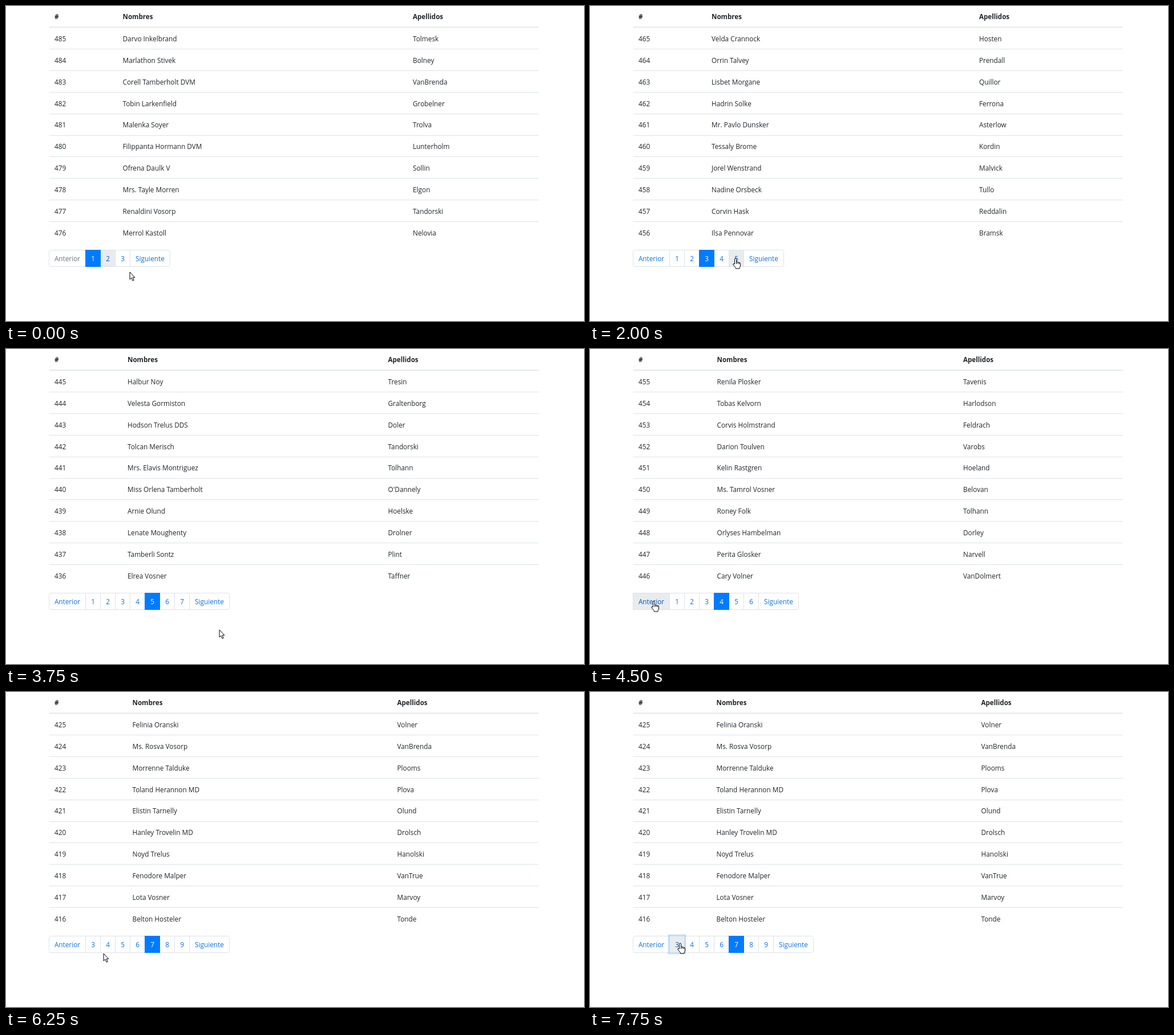
These frames come from a looping animation (1013x553 px, 8 s). An HTML page:

```html
<!DOCTYPE html>
<html lang="es">
<head>
<meta charset="utf-8">
<style>
  html, body { margin: 0; width: 100%; height: 100%; overflow: hidden; background: #fff; }
  svg { display: block; font: 11.8px "Open Sans", "Noto Sans", sans-serif; fill: #212529; }
  .head { font-weight: 700; font-size: 11.6px; }
  .mid { text-anchor: middle; }
</style>
</head>
<body>
<svg id="stage" width="1013" height="553" viewBox="0 0 1013 553"></svg>
<script>
const LOOP = 8000, STEP = 250;
const ROW = 37.87;
const GRAY = '#dee2e6', BLUE = '#007bff';
const bar = { left: 75, top: 428, height: 30, first: 139, cell: 26, next: 70 };

// Each page: x of both name columns and its ten rows.
const pages = {
  1: [204.5, 713, `Darvo Inkelbrand|Tolmesk
Marlathon Stivek|Bolney
Corell Tamberholt DVM|VanBrenda
Tobin Larkenfield|Grobelner
Malenka Soyer|Trolva
Filippanta Hormann DVM|Lunterholm
Ofrena Daulk V|Sollin
Mrs. Tayle Morren|Elgon
Renaldini Vosorp|Tandorski
Merrol Kastoll|Nelovia`],
  2: [213, 678, `Toki Senk|Orlen
Zuny Mallows|Trevolinsk
Lester Vordanan|Haskold
Ren Molders|Felunke
Arlen Plove III|Tolander
Ms. Delga Frostenhall|Pinder
Kip Sorel Sr.|Abunela
Elina Vordander|Morvay
Nelis Tarby|Letoris
Marnel Grund|Doler`],
  3: [213, 682, `Velda Crannock|Hosten
Orrin Talvey|Prendall
Lisbet Morgane|Quillor
Hadrin Solke|Ferrona
Mr. Pavlo Dunsker|Asterlow
Tessaly Brome|Kordin
Jorel Wenstrand|Malvick
Nadine Orsbeck|Tullo
Corvin Hask|Reddalin
Ilsa Pennovar|Bramsk`],
  4: [222.5, 654, `Renila Plosker|Tavenis
Tobas Kelvorn|Harlodson
Corvis Holmstrand|Feldrach
Darion Toulven|Varobs
Kelin Rastgren|Hoeland
Ms. Tamrol Vosner|Belovan
Roney Folk|Tolhann
Orlyses Hambelman|Dorley
Perita Glosker|Narvell
Cary Volner|VanDolmert`],
  5: [213, 669.5, `Halbur Noy|Tresin
Velesta Gormiston|Graltenborg
Hodson Trelus DDS|Doler
Tolcan Merisch|Tandorski
Mrs. Elavis Montriguez|Tolhann
Miss Orlena Tamberholt|O'Dannely
Arnie Olund|Hoelske
Lenate Moughenty|Drolner
Tamberli Sontz|Plint
Elrea Vosner|Taffner`],
  7: [221.5, 685.5, `Felinia Oranski|Volner
Ms. Rosva Vosorp|VanBrenda
Morrenne Talduke|Plooms
Toland Herannon MD|Plova
Elistin Tarnelly|Olund
Hanley Trovelin MD|Drolsch
Noyd Trelus|Hanolski
Fenodore Malper|VanTrue
Lota Vosner|Marvoy
Belton Hosteler|Tonde`]
};

// A click focuses a button when pressed and shows its page once loaded.
const clicks = [
  { press: 750, load: 1250, page: 2 },
  { press: 1750, load: 2000, page: 3 },
  { press: 2500, load: 2750, page: 4 },
  { press: 3000, load: 3250, page: 5 },
  { press: 4250, load: 4500, page: 4 },
  { press: 5000, load: 5250, page: 5 },
  { press: 5750, load: 6000, page: 7 },
  { press: 7750, load: LOOP, page: 3 }
];

// Pointer key points: time, x, y
const path = [
  [0, 217, 467], [750, 255, 443], [2000, 255, 443], [2500, 301, 440], [3250, 301, 440],
  [3750, 374, 493], [4250, 112, 443], [4500, 112, 443], [5000, 257, 443], [5250, 284, 469],
  [5500, 308, 442], [5750, 308, 442], [6000, 248, 490], [6250, 171, 459], [6750, 150, 474],
  [7750, 158, 441]
];

function pointerAt(t) {
  const i = path.findLastIndex(p => p[0] <= t);
  const [t0, x0, y0] = path[i];
  const [t1, x1, y1] = path[i + 1] || [LOOP, x0, y0];
  const k = (t - t0) / (t1 - t0);
  return [Math.round(x0 + (x1 - x0) * k), Math.round(y0 + (y1 - y0) * k)];
}

const text = (x, y, s, attrs = '') => `<text x="${x}" y="${y}" ${attrs}>${s}</text>`;
const rect = (x, y, w, h, attrs) =>
  `<rect x="${x}" y="${y}" width="${w}" height="${h}" ${attrs}/>`;
const rule = (y, height) => rect(76, y, 857.5, height, `fill="${GRAY}"`);

function table(page) {
  const [nameX, surnameX, rows] = pages[page];
  const row = (y, cells, attrs) =>
    [85, nameX, surnameX].map((x, i) => text(x, y, cells[i], attrs)).join('');
  let out = row(23, ['#', 'Nombres', 'Apellidos'], 'class="head"') + rule(36.5, 1.5);
  rows.split('\n').forEach((names, i) => {
    out += row(62 + ROW * i, [495 - 10 * page - i, ...names.split('|')]);
    if (i) out += rule(Math.round(37.2 + ROW * i), 1);
  });
  return out;
}

// Neighbouring buttons share a one pixel border.
function buttons(page) {
  const list = [];
  let x = bar.left;
  const add = (label, w) => {
    list.push({ label, x, w: w + 1 });
    x += w;
  };
  add('Anterior', bar.first - bar.left);
  for (let n = Math.max(1, page - 4); n <= page + 2; n++) add(n, bar.cell);
  add('Siguiente', bar.next);
  return list;
}

function pagination(page, px, py, pressed, lingering) {
  const { left, top, height } = bar;
  const list = buttons(page);
  const last = list[list.length - 1];
  let fills = '', borders = '', marks = '', labels = '';
  for (const { label, x, w } of list) {
    const active = label === page;
    const disabled = page === 1 && label === 'Anterior';
    const under = py < top + height && px >= x && px < x + w - 1;
    const hover = !disabled && (under || label === lingering);
    const color = active ? '#fff' : disabled ? '#6c757d' : hover ? '#0056b3' : '#0b72e0';
    if (hover) fills += rect(x, top, w, height, 'fill="#e9ecef"');
    if (x > left) borders += rect(x, top, 1, height, `fill="${GRAY}"`);
    if (active) marks += rect(x, top, w, height, `fill="${BLUE}"`);
    if (under && pressed) {
      marks += rect(x - 1, top - 1, w + 2, height + 2,
        `fill="none" stroke="${BLUE}" stroke-opacity=".25" stroke-width="2.5"`);
    }
    labels += text(x + w / 2, 448.2, label, `class="mid" fill="${color}"`);
  }
  const frame = rect(left + 0.5, top + 0.5, last.x + last.w - left - 1, height - 1,
    `rx="3" fill="none" stroke="${GRAY}"`);
  return fills + borders + frame + marks + labels;
}

function pointer(x, y) {
  const hand = y < bar.top + bar.height;
  const shape = hand
    ? 'M-1.5 10V1.5a1.5 1.5 0 0 1 3 0V6.5q1.6-.9 2.6.4 1.6-.6 2.4.6 2-.4 2 1.7V13q0 2-1.5 3.2V18H.3V16.4L-4 11.2q-.6-1.7 1-1.8z' +
      'M1.5 6.5V10M4.1 7v3M6.5 7.6V10'
    : 'M0 0V13L3 10.3 5 15.3 7.2 14.4 5.2 9.5H8.8Z';
  return `<path transform="translate(${x} ${y})" d="${shape}" fill="#fff" stroke="#000" stroke-linejoin="round"/>`;
}

const stage = document.getElementById('stage');
let shown;
function draw(now) {
  const t = Math.floor(now % LOOP / STEP) * STEP;
  if (t !== shown) {
    shown = t;
    const page = clicks.findLast(c => c.load <= t)?.page ?? 1;
    const pressed = clicks.some(c => c.press <= t && t < c.load);
    const lingering = t < STEP ? 2 : null;
    const [x, y] = pointerAt(t);
    stage.innerHTML = table(page) + pagination(page, x, y, pressed, lingering) + pointer(x, y);
  }
  requestAnimationFrame(draw);
}
draw(0);
</script>
</body>
</html>
```
